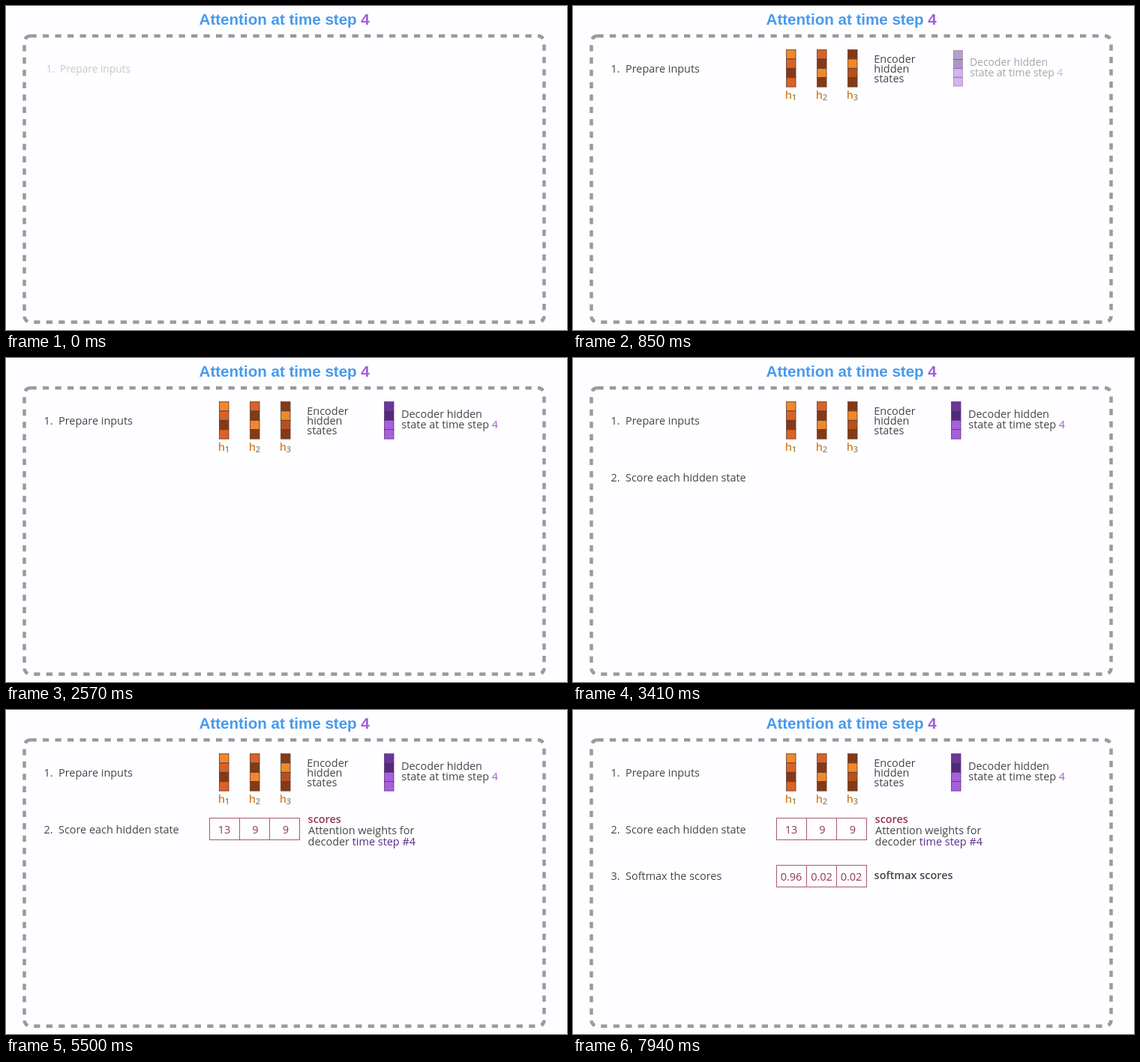
These frames come from a looping animation (748 by 433 pixels, 8 s). An HTML page with a canvas:

```html
<!DOCTYPE html>
<html lang="en">
<head>
<meta charset="utf-8">
<title>Attention at time step 4</title>
<style>
  html, body { margin: 0; width: 100%; height: 100%; overflow: hidden; background: #fefdff; }
  canvas { display: block; width: 748px; height: 433px; }
</style>
</head>
<body>
<canvas id="stage"></canvas>
<script>
const W = 748, H = 433, LOOP = 8000, FADE = 350;
const SANS = '"Open Sans", "Noto Sans", sans-serif';
const BODY = 14.45;
const INK = '#454649', WINE = '#933650', VIOLET = '#a45bd9', PLUM = '#5a2d87';
const AMBER = '#f0882b', RUST = '#d9622a', BROWN = '#843a17', SIENNA = '#b5501f';

const canvas = document.getElementById('stage');
const ctx = canvas.getContext('2d');
const dpr = window.devicePixelRatio || 1;
canvas.width = W * dpr;
canvas.height = H * dpr;

// Draws a run of text and returns where it ends.
function text(str, x, y, color = INK, font = `${BODY}px ${SANS}`, align = 'left') {
  ctx.font = font;
  ctx.fillStyle = color;
  ctx.textAlign = align;
  ctx.fillText(str, x, y);
  return x + ctx.measureText(str).width;
}

const bold = `600 ${BODY}px ${SANS}`;

function column(x, colors, edge) {
  const top = 58.5, w = 12.5, h = 12.4;
  ctx.strokeStyle = edge;
  ctx.lineWidth = 0.8;
  colors.forEach((color, i) => {
    ctx.fillStyle = color;
    ctx.fillRect(x, top + i * h, w, h);
    ctx.strokeRect(x, top + i * h, w, h);
  });
}

function step(n, label, y) {
  text(n + '.', 50.5, y);
  text(label, 70, y);
}

function scoreRow(values, y, centers) {
  ctx.strokeStyle = '#ab5772';
  ctx.lineWidth = 1;
  ctx.strokeRect(271.5, y, 120, 29);
  ctx.beginPath();
  for (const x of [311.5, 351.5]) {
    ctx.moveTo(x, y);
    ctx.lineTo(x, y + 29);
  }
  ctx.stroke();
  values.forEach((v, i) => text(v, centers[i], y + 20.2, WINE, undefined, 'center'));
}

function encoder() {
  const states = [
    [284.5, [AMBER, RUST, BROWN, RUST]],
    [325.5, [RUST, BROWN, AMBER, BROWN]],
    [366.5, [BROWN, AMBER, SIENNA, BROWN]]
  ];
  states.forEach(([x, colors], i) => {
    column(x, colors, '#5f3a2a');
    text('h', x - 1.8, 124.3, '#d6842a', `600 14.6px ${SANS}`);
    text(i + 1, x + 7.3, 126.2, '#84905a', `600 11px ${SANS}`);
  });
  ['Encoder', 'hidden', 'states'].forEach((s, i) => text(s, 401.3, 75.6 + i * 13.3));
}

function decoder() {
  column(504.5, ['#6a3796', '#53297a', '#a95fdc', '#a95fdc'], '#56387a');
  text('Decoder hidden', 527, 80.4);
  const end = text('state at time step ', 527.3, 94);
  text('4', end, 94, VIOLET);
}

function scores() {
  scoreRow(['13', '9', '9'], 144.5, [291, 332.3, 373]);
  text('scores', 402.6, 151.3, WINE, bold);
  text('Attention weights for', 403, 165.6);
  const end = text('decoder ', 402.6, 181);
  text('time step #4', end, 181, PLUM);
}

function softmax() {
  scoreRow(['0.96', '0.02', '0.02'], 207.5, [291, 331.5, 371]);
  text('softmax scores', 401.6, 225.8, INK, bold);
}

// Each part grows slightly about its centre while it fades in.
const parts = [
  { start: -100, cx: 110, cy: 85, draw: () => step(1, 'Prepare inputs', 89.4) },
  { start: 290, cx: 370, cy: 92, draw: encoder },
  { start: 685, cx: 580.5, cy: 83, draw: decoder },
  { start: 3030, cx: 141, cy: 160, draw: () => step(2, 'Score each hidden state', 165) },
  { start: 3430, cx: 409, cy: 161, draw: scores },
  { start: 6060, cx: 125, cy: 222, draw: () => step(3, 'Softmax the scores', 227.2) },
  { start: 6460, cx: 389, cy: 222, draw: softmax }
];

// The dashes run clockwise from the end of the top left corner.
function frame() {
  const x = 24.5, y = 40, w = 693, h = 382.5, r = 8, dash = 8.25;
  ctx.strokeStyle = '#9a999c';
  ctx.lineWidth = 4.5;
  ctx.setLineDash([dash, dash]);
  ctx.beginPath();
  ctx.moveTo(x + r, y);
  ctx.arcTo(x + w, y, x + w, y + h, r);
  ctx.arcTo(x + w, y + h, x, y + h, r);
  ctx.arcTo(x, y + h, x, y, r);
  ctx.arcTo(x, y, x + w, y, r);
  ctx.stroke();
  ctx.setLineDash([]);
}

function title() {
  const font = 'bold 20.55px "Liberation Sans", Arial, sans-serif';
  const end = text('Attention at time step ', 257.6, 25, '#469aec', font);
  text('4', end, 25, VIOLET, font);
}

function render(now) {
  const t = now % LOOP;
  ctx.setTransform(dpr, 0, 0, dpr, 0, 0);
  ctx.fillStyle = '#fefdff';
  ctx.fillRect(0, 0, W, H);
  title();
  frame();
  for (const { start, cx, cy, draw } of parts) {
    const p = Math.min(1, (t - start) / FADE);
    if (p <= 0) continue;
    const s = 0.93 + 0.07 * p;
    ctx.save();
    ctx.globalAlpha = p;
    ctx.translate(cx, cy);
    ctx.scale(s, s);
    ctx.translate(-cx, -cy);
    draw();
    ctx.restore();
  }
}

const began = performance.now();
function tick() {
  render(performance.now() - began);
  requestAnimationFrame(tick);
}
tick();
</script>
</body>
</html>
```
